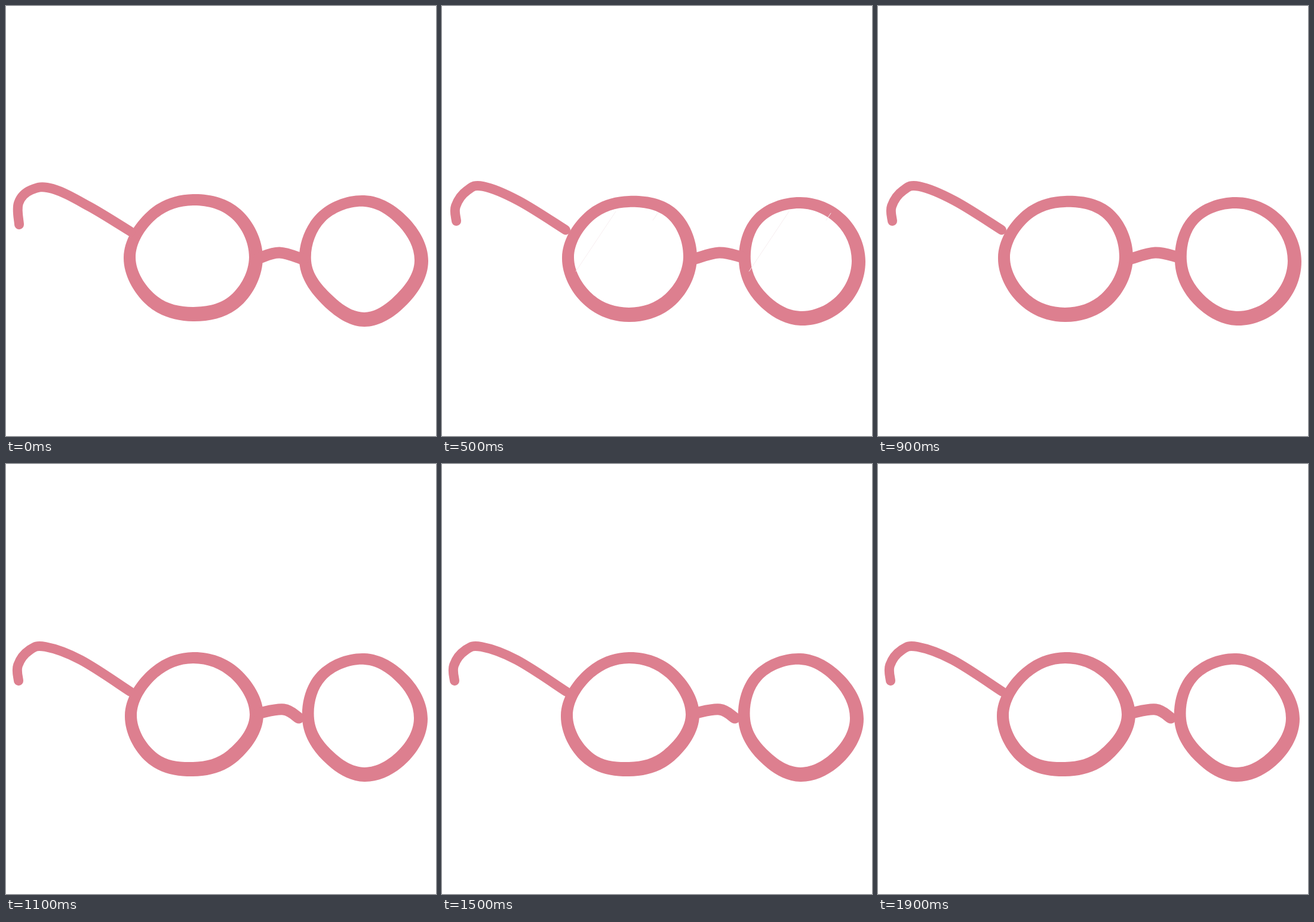
An HTML page for the animation above (2000 ms loop, 720 by 720 pixels).

```html
<!DOCTYPE html>
<html lang="en">
<head>
<meta charset="utf-8">
<title>Glasses</title>
<style>
  html, body { margin: 0; width: 100%; height: 100%; overflow: hidden; background: #fff; }
  svg { display: block; width: 100vw; height: 100vh; }
  path { fill: none; stroke-linecap: round; }
  .rim { fill: #dd7f8f; fill-rule: evenodd; }
  .bar { stroke: #dd7f8f; }
  .glint { stroke: #f7eef0; stroke-width: 1; }
</style>
</head>
<body>
<svg id="stage" viewBox="0 0 720 720"></svg>
<script>
const STEP = 100, LOOP = 2000;
const LEFT = [313, 421], RIGHT = [600, 427];
const stage = document.getElementById('stage');

function add(parent, tag, attrs) {
  const el = document.createElementNS('http://www.w3.org/2000/svg', tag);
  for (const k in attrs) el.setAttribute(k, attrs[k]);
  return parent.appendChild(el);
}

// Smooth path through a few key points
function curve(pts, closed) {
  const n = pts.length;
  const at = i => pts[closed ? (i + n) % n : Math.max(0, Math.min(n - 1, i))];
  let d = 'M' + pts[0];
  for (let i = 0; i < (closed ? n : n - 1); i++) {
    const [a, b, c, e] = [at(i - 1), at(i), at(i + 1), at(i + 2)];
    const c1 = b.map((v, k) => v + (c[k] - a[k]) / 5.4);
    const c2 = c.map((v, k) => v - (e[k] - b[k]) / 5.4);
    d += `C${c1} ${c2} ${c}`;
  }
  return d + (closed ? 'Z' : '');
}

// Hand-drawn ring: radii run clockwise from the right, the line is heaviest at lower right
function ring([cx, cy], radii) {
  const contour = inset => curve(radii.map((r, i) => {
    const a = i * 2 * Math.PI / radii.length;
    const d = r - inset * (21.5 + 3 * Math.cos(a - Math.PI / 3));
    return [cx + d * Math.cos(a), cy + d * Math.sin(a)];
  }), true);
  return contour(0) + contour(1);
}

function pose(left, right, bridge, arm) {
  const g = add(stage, 'g', { visibility: 'hidden' });
  const points = s => s.split(' ').map(p => p.split(',').map(Number));
  const bar = (s, width) => add(g, 'path', { class: 'bar', d: curve(points(s)), 'stroke-width': width });
  add(g, 'path', { class: 'rim', d: ring(LEFT, left) });
  add(g, 'path', { class: 'rim', d: ring(RIGHT, right) });
  bar(bridge, 19);
  bar(arm, 16);
  return g;
}

const poses = [
  pose([117, 114, 107, 111, 116, 108, 106, 113], [107, 102, 110, 101, 109, 112, 110, 103],
    '424,422 458,413 497,424', '22,366 21,330 42,308 78,306 140,336 209,378'),
  pose([114, 111, 108, 109, 112, 105, 103, 113], [109, 109, 108, 101, 103, 109, 107, 107],
    '424,423 464,413 501,420', '24,360 23,335 42,309 69,302 128,326 207,375'),
  pose([112, 113, 106, 109, 113, 105, 104, 110], [105, 105, 107, 101, 107, 111, 109, 103],
    '423,423 463,410 498,422', '20,363 18,340 37,311 66,303 135,332 212,378'),
  pose([118, 107, 102, 110, 114, 106, 106, 110], [106, 102, 105, 98, 104, 111, 110, 103],
    '424,417 465,411 490,425', '21,363 20,337 39,312 66,306 125,328 208,381')
];

const glint = add(stage, 'path', { class: 'glint' });

// The same slanted reflection on both lenses
const streak = (x, y, len) =>
  [0, 290].map(dx => `M${x + dx},${y}l${-0.556 * len},${0.834 * len}`).join('');

function glintAt(step) {
  if (step < 2 || step > 7) return '';
  if (step < 4) return streak(291, 344, 34) + streak(236, 433, 24);
  if (step < 7) return streak(291, 344, 120) + streak(361, 347, 14);
  return streak(250, 457, 18);
}

function draw(t) {
  const step = Math.floor((t % LOOP) / STEP);
  poses.forEach((g, i) => g.setAttribute('visibility', i === step % poses.length ? 'visible' : 'hidden'));
  glint.setAttribute('d', glintAt(step));
}

const start = performance.now();
function tick() {
  draw(performance.now() - start);
  requestAnimationFrame(tick);
}
tick();
</script>
</body>
</html>
```
